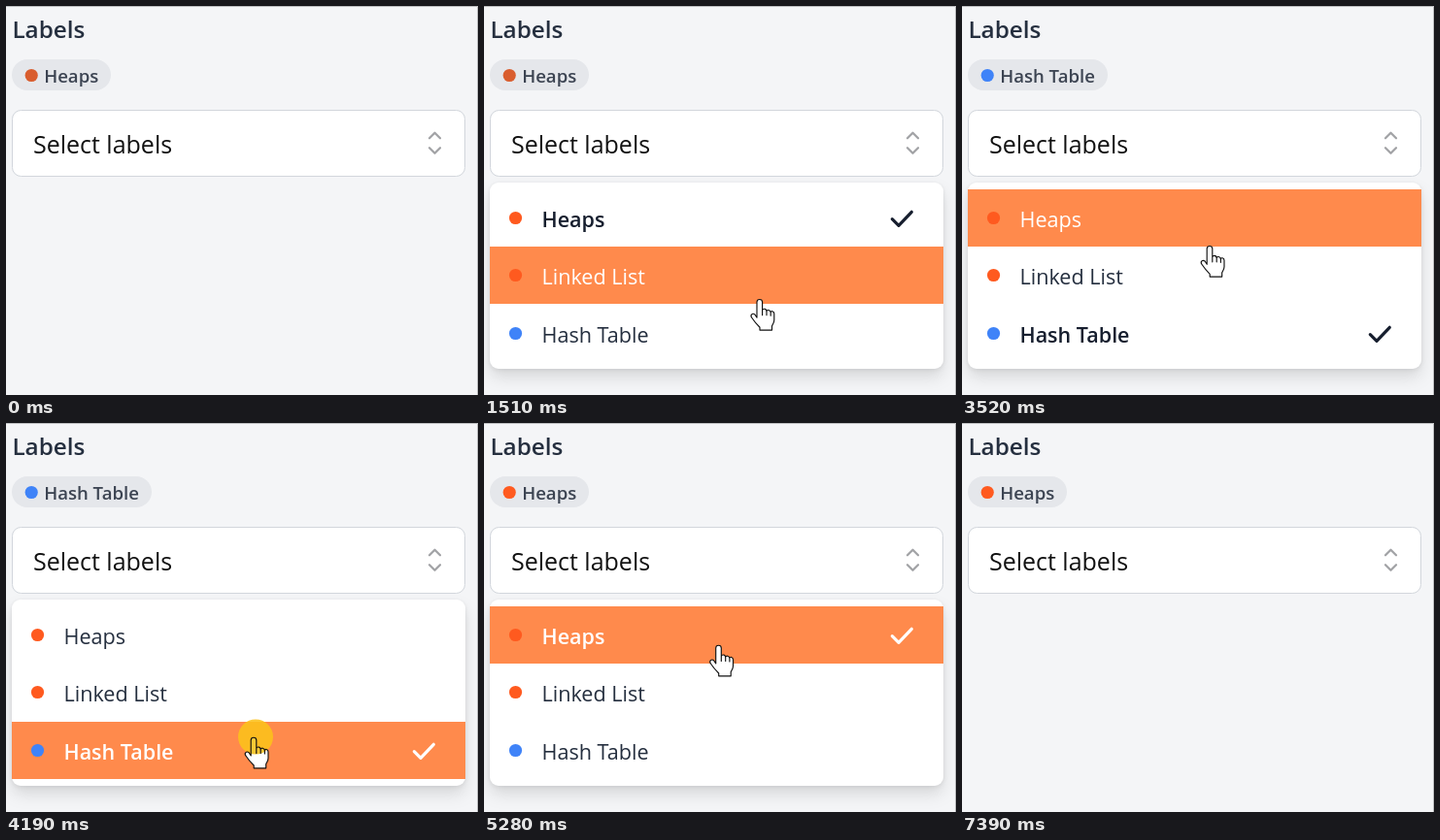
These frames come from a looping animation (486x401 px, 7780 ms). An HTML page:

```html
<!DOCTYPE html>
<html lang="en">
<head>
<meta charset="utf-8">
<title>Label picker</title>
<style>
  html, body { margin: 0; width: 100%; height: 100%; overflow: hidden; background: #f4f5f7; }
  svg { display: block; width: 486px; height: 401px; font-family: "Open Sans", "Noto Sans", sans-serif; }
  .panel { fill: #fff; filter: drop-shadow(0 9px 8px rgba(0,0,0,.11)) drop-shadow(0 1px 2px rgba(0,0,0,.09)); }
  .chip text { font-size: 18.6px; font-weight: 600; fill: #3c4452; }
  .row text { font-size: 21.6px; fill: #252f3f; }
  .row .tick { stroke: #161e2e; stroke-width: 3.2; visibility: hidden; }
  .row .bar { fill: #ff8a4c; visibility: hidden; }
  .row.on text { font-size: 21.5px; font-weight: 600; fill: #161e2e; }
  .row.on .tick { visibility: visible; }
  .row.hot .bar { visibility: visible; }
  .row.hot text { fill: #fff; }
  .row.hot .tick { stroke: #fff; }
  .line { fill: none; stroke-linecap: round; stroke-linejoin: round; }
</style>
</head>
<body>
<svg viewBox="0 0 486 401">
  <rect width="486" height="401" fill="#f4f5f7"/>
  <path d="M0 .5H485.5V401" fill="none" stroke="#c2c3c5"/>
  <text x="6.4" y="33" font-size="24.3" font-weight="600" fill="#252f3f">Labels</text>
  <g id="chips"></g>
  <rect x="6.5" y="107.5" width="466" height="68" rx="9" fill="#fff" stroke="#d2d6dc"/>
  <text x="28" y="152" font-size="25" fill="#111">Select labels</text>
  <path class="line" d="M436 136.2l5.5-5.5 5.5 5.5M436 146.2l5.5 5.5 5.5-5.5" stroke="#a2a3a6" stroke-width="2.3"/>
  <g id="menu">
    <rect class="panel" x="6" y="182" width="467" height="192" rx="9"/>
  </g>
  <g id="cursor">
    <path id="body" fill="#fff"/>
    <circle id="press" r="18" fill="#fcc21b" opacity=".88"/>
    <path id="edge" class="line" stroke="#111" stroke-width="1.15"/>
  </g>
</svg>
<script>
const LOOP = 7780;
const ORANGE = '#ff5a1f', BLUE = '#3f83f8', DULL = '#d95d2e';
const ROW_TOP = 189, ROW_H = 59.5;
const HAND = 'M-4.8 19.5V3.5a2.8 2.8 0 0 1 5.6 0V12.5c0-3 4.4-2.5 4.4.8c0-2.5 4.2-2 4.2 1c0-2.2 3.6-1.8 3.6 1.2V22' +
  'c0 3-1.8 4.5-2.3 6.2V32.3H-1.8V29.5c-2.5-2.5-6-6.5-8.3-10c-2-3 1-5 3.2-3.3zM.8 12.5V17M5.2 13.3V17M9.4 14.3V17.5';
const ARROW = 'M0 0V25L6 19.5L10 28.5L14 26.8L10.2 18H18Z';

const linear = s => s;
const smooth = s => (1 - Math.cos(Math.PI * s)) / 2;
const easeOut = s => 1 - (1 - s) ** 2;
const easeIn = s => s ** 1.5;

// Pointer stops: time, x, y, easing used to arrive there
const STOPS = [
  [20, 434, 398],
  [490, 319, 144, smooth],
  [682, 319, 144, linear],
  [1760, 281, 324.5, smooth],
  [2510, 281, 324.5, linear],
  [2960, 257, 219, smooth],
  [3400, 257, 219, linear],
  [3520, 257, 246.5, linear],
  [4030, 257, 323.5, easeOut],
  [4310, 257, 323.5, linear],
  [4770, 243.5, 228.5, smooth],
  [5930, 243.5, 228.5, linear],
  [6450, 253, 72, smooth],
  [6800, 253, 72, linear],
  [7390, 425, 403, easeIn]
];
const PRESSES = [[520, 670], [1910, 2030], [3070, 3200], [4190, 4270], [5100, 5250], [6500, 6600]];

const $ = id => document.getElementById(id);
const within = (t, a, b) => t >= a && t < b;

function add(parent, tag, attrs, text) {
  const el = document.createElementNS('http://www.w3.org/2000/svg', tag);
  for (const k in attrs) el.setAttribute(k, attrs[k]);
  if (text) el.textContent = text;
  return parent.appendChild(el);
}

function makeChip(name, width, color) {
  const g = add($('chips'), 'g', { class: 'chip' });
  add(g, 'rect', { y: 55, width, height: 32, rx: 16, fill: '#e5e7eb' });
  const dot = add(g, 'circle', { cx: 20.2, cy: 71.5, r: 6.6, fill: color });
  add(g, 'text', { x: 33.2, y: 79 }, name);
  return { g, dot };
}

function makeRow(name, i, color) {
  const y = Math.floor(ROW_TOP + i * ROW_H);
  const g = add($('menu'), 'g', { class: 'row' });
  add(g, 'rect', { class: 'bar', x: 6, y, width: 467, height: 59 });
  add(g, 'circle', { cx: 32.5, cy: y + 29.5, r: 6.6, fill: color });
  add(g, 'text', { x: 59.5, y: y + 39 }, name);
  add(g, 'path', { class: 'line tick', d: `M420.3 ${y + 30.6}l6.7 6.7 13.3-14` });
  return g;
}

const heapsChip = makeChip('Heaps', 102, DULL);
const hashChip = makeChip('Hash Table', 144, BLUE);
const rows = [['Heaps', ORANGE], ['Linked List', ORANGE], ['Hash Table', BLUE]]
  .map(([name, color], i) => makeRow(name, i, color));

function pointerAt(t) {
  const i = STOPS.findIndex(s => s[0] > t);
  if (i < 1) return null;
  const [t0, x0, y0] = STOPS[i - 1], [t1, x1, y1, ease] = STOPS[i];
  const p = ease((t - t0) / (t1 - t0));
  return { x: x0 + (x1 - x0) * p, y: y0 + (y1 - y0) * p };
}

function show(el, on) { el.style.display = on ? '' : 'none'; }

function draw(t) {
  const heaps = t < 3230 || t >= 5280;
  const hash = within(t, 2060, 4300);
  const open = within(t, 670, 6720);
  const tip = pointerAt(t);

  show(heapsChip.g, heaps);
  show(hashChip.g, hash);
  heapsChip.g.setAttribute('transform', 'translate(6 0)');
  heapsChip.dot.setAttribute('fill', t < 3230 ? DULL : ORANGE);
  hashChip.g.setAttribute('transform', `translate(${heaps ? 115 : 6} 0)`);

  show($('menu'), open);
  $('menu').setAttribute('opacity', t < 6600 ? 1 : Math.max(0, 1 - (t - 6600) / 120));
  const hot = tip ? Math.floor((tip.y - ROW_TOP) / ROW_H) : -1;
  rows.forEach((row, i) => {
    row.classList.toggle('on', [heaps, false, hash][i]);
    row.classList.toggle('hot', i === hot);
  });

  show($('cursor'), tip);
  if (!tip) return;
  const shape = within(tip.y, 107, open ? 374 : 176) ? HAND : ARROW;
  $('body').setAttribute('d', shape);
  $('edge').setAttribute('d', shape);
  $('cursor').setAttribute('transform', `translate(${tip.x} ${tip.y})`);
  show($('press'), PRESSES.some(([a, b]) => within(t, a, b)));
}

const start = performance.now();
function tick() {
  draw((performance.now() - start) % LOOP);
  requestAnimationFrame(tick);
}
tick();
</script>
</body>
</html>
```
